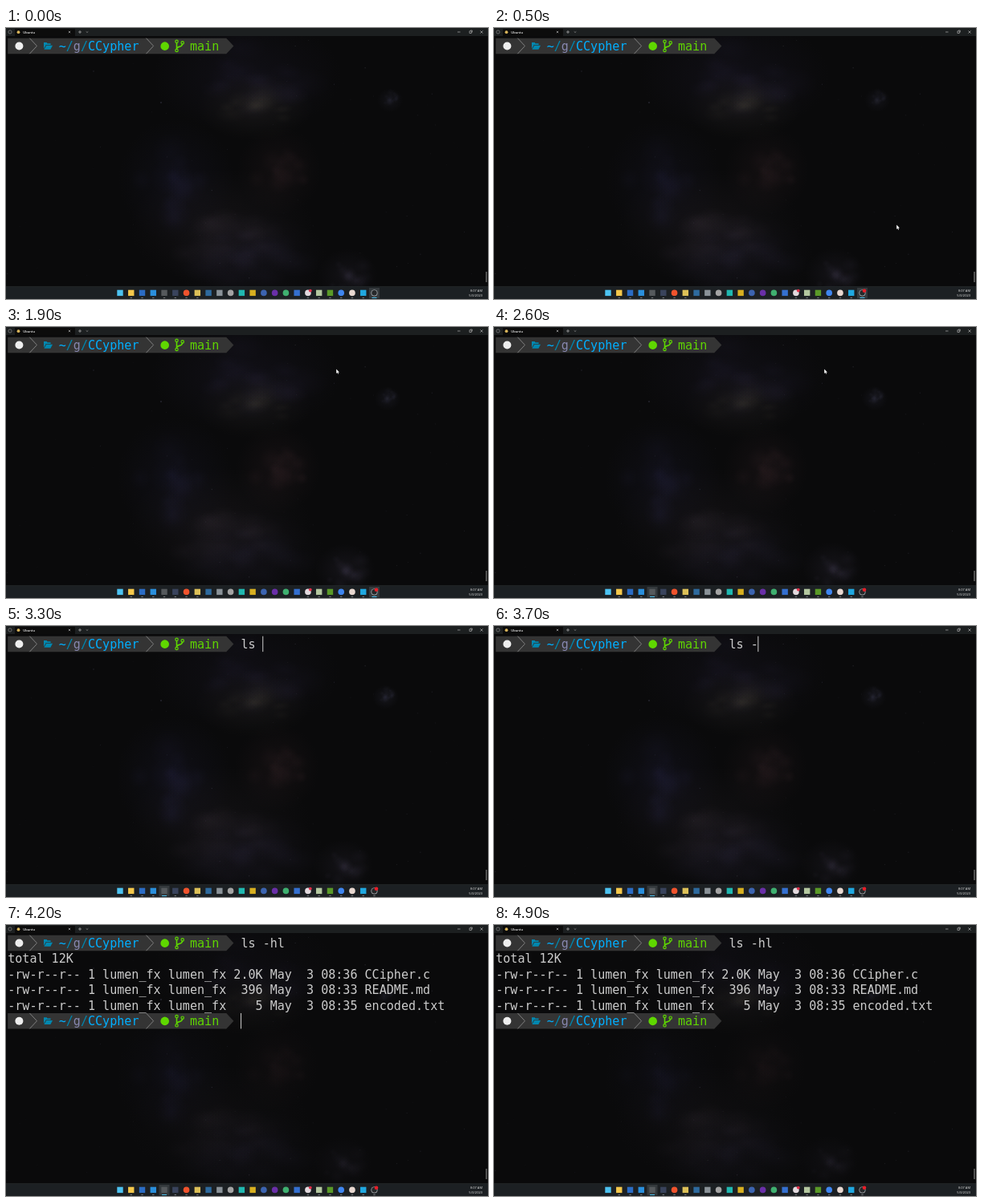
These frames come from a looping animation (600 by 338 pixels, 5 s). An HTML page with a canvas:

```html
<!DOCTYPE html>
<html lang="en">
<head>
<meta charset="utf-8">
<title>Terminal session</title>
<style>
  html, body { margin: 0; width: 100%; height: 100%; overflow: hidden; background: #0a0a0b; }
  canvas { display: block; width: 600px; height: 338px; }
</style>
</head>
<body>
<canvas id="stage"></canvas>
<script>
const W = 600, H = 338, LOOP = 5000, STEP = 100;
const CELL = 9.07, ROW = 19.45, LEFT = 2.2, TOP = 12.7;
const MONO = '15.07px "DejaVu Sans Mono", monospace';
const SANS = '"Open Sans", "Noto Sans", sans-serif';
const BLUE = '#0087af', BRIGHT_BLUE = '#00afff', GREEN = '#5fd700', TEXT = '#cccccc';
const USER = 'lumen_fx';

const FOCUS_AT = 2000, TYPING_AT = 3000, ENTER_AT = 4200, BLINK = 600;
const keys = [[3000, 'l'], [3100, 's'], [3300, ' '], [3600, '-'], [3800, 'h'], [4000, 'l']];

const listing = [
  'total 12K',
  `-rw-r--r-- 1 ${USER} ${USER} 2.0K May  3 08:36 CCipher.c`,
  `-rw-r--r-- 1 ${USER} ${USER}  396 May  3 08:33 README.md`,
  `-rw-r--r-- 1 ${USER} ${USER}    5 May  3 08:35 encoded.txt`
];

// x, y, horizontal radius, vertical radius, colour
const clouds = [
  [300, 60, 95, 58, '58,50,92'],
  [310, 98, 58, 34, '84,78,66'],
  [212, 190, 58, 62, '48,46,92'],
  [340, 178, 42, 44, '88,56,62'],
  [268, 248, 92, 58, '78,66,78'],
  [300, 285, 80, 45, '58,52,84'],
  [478, 90, 13, 12, '86,86,122'],
  [425, 308, 30, 26, '86,78,108']
];

const taskIcons = [
  '#4cc2f0', '#f5c84b', '#2b6cc4', '#2a8fdc', '#55595c', '#39435c', '#f0532d', '#dcc058',
  '#2e6a9e', '#8a9298', '#a4a4a4', '#20b8b0', '#d8b020', '#3c64b0', '#6a2fa8', '#3fb070',
  '#3470d0', '#e2dade', '#b4c8a0', '#5a9a28', '#3f86f0', '#e8d8d0', '#20a8e0', '#b8bcc0'
];
const roundIcons = [6, 10, 13, 14, 15, 17, 20, 21, 23];
const runningIcons = [1, 2, 3, 4, 5, 6, 7, 17, 18, 19, 20, 21, 22, 23];
const TERMINAL = 4, RECORDER = 23;

const canvas = document.getElementById('stage');
const ratio = window.devicePixelRatio || 1;
canvas.width = W * ratio;
canvas.height = H * ratio;
const ctx = canvas.getContext('2d');
ctx.scale(ratio, ratio);

const colX = col => LEFT + col * CELL;
const mix = (a, b, k) => a + (b - a) * k;
const progress = (t, from, to) => Math.min(1, Math.max(0, (t - from) / (to - from)));
const easeOut = k => 1 - (1 - k) ** 2;

function seeded(seed) {
  return () => (seed = seed * 16807 % 2147483647) / 2147483647;
}

function rect(x, y, w, h, color) {
  ctx.fillStyle = color;
  ctx.fillRect(x, y, w, h);
}

function disc(x, y, r, color) {
  ctx.fillStyle = color;
  ctx.beginPath();
  ctx.arc(x, y, r, 0, 7);
  ctx.fill();
}

function trace(points, close) {
  ctx.beginPath();
  points.forEach(([x, y]) => ctx.lineTo(x, y));
  if (close) ctx.closePath();
}

function polygon(points, color) {
  trace(points, true);
  ctx.fillStyle = color;
  ctx.fill();
}

function polyline(points, color, width) {
  trace(points);
  ctx.strokeStyle = color;
  ctx.lineWidth = width;
  ctx.stroke();
}

function label(text, x, y, color, font, align = 'left') {
  ctx.font = font;
  ctx.textAlign = align;
  ctx.fillStyle = color;
  ctx.fillText(text, x, y);
}

function mono(text, col, row, color = TEXT) {
  label(text, colX(col), TOP + row * ROW + 15, color, MONO);
}

function puff(x, y, rx, ry, rgb, alpha) {
  ctx.save();
  ctx.translate(x, y);
  ctx.scale(rx, ry);
  const glow = ctx.createRadialGradient(0, 0, 0, 0, 0, 1);
  glow.addColorStop(0, `rgba(${rgb},${alpha})`);
  glow.addColorStop(0.5, `rgba(${rgb},${alpha * 0.5})`);
  glow.addColorStop(1, `rgba(${rgb},0)`);
  ctx.fillStyle = glow;
  ctx.fillRect(-1, -1, 2, 2);
  ctx.restore();
}

function drawSky(t) {
  rect(0, 0, W, H, '#0a0a0b');
  const random = seeded(4211);
  const drift = t / LOOP;
  const dim = t >= ENTER_AT ? 0.6 : 1;
  clouds.forEach(([x, y, rx, ry, rgb], i) => {
    const cx = x - drift * (i > 5 ? 8 : 4), cy = y - drift * (i > 6 ? 14 : 2);
    const pulse = dim * (1 + 0.12 * Math.sin(drift * 2 * Math.PI + i * 1.7));
    puff(cx, cy, rx * 1.25, ry * 1.25, rgb, 0.13 * pulse);
    for (let n = 0; n < 16; n++) {
      const angle = random() * 7, reach = random() * 0.8, size = mix(0.16, 0.42, random());
      puff(cx + Math.cos(angle) * reach * rx, cy + Math.sin(angle) * reach * ry,
        rx * size, ry * size, rgb, 0.07 * pulse);
    }
  });
  for (let n = 0; n < 70; n++) {
    const x = random() * W, y = 14 + random() * 306;
    disc(x, y, 0.4 + random() * 0.3, `rgba(150,150,175,${0.05 + random() * 0.14})`);
  }
  disc(193, 93, 0.8, 'rgba(150,150,185,0.35)');
  disc(109, 54, 0.7, 'rgba(150,150,185,0.22)');
}

function drawTitleBar() {
  rect(0, 0, W, 10, '#1c1f20');
  rect(11, 1, 75, 9, '#0c0c0c');
  ctx.strokeStyle = '#9a9a9a';
  ctx.lineWidth = 0.6;
  ctx.beginPath();
  ctx.arc(5, 5, 2.1, 0, 7);
  ctx.stroke();
  disc(15.5, 5.2, 1.9, '#d8b45a');
  label('Ubuntu', 21.3, 6.6, '#f2f2f2', `600 4px ${SANS}`);
  const line = '#c8c8c8';
  const cross = (x, y, r) => {
    polyline([[x - r, y - r], [x + r, y + r]], line, 0.6);
    polyline([[x - r, y + r], [x + r, y - r]], line, 0.6);
  };
  cross(79, 5, 1.2);
  polyline([[90, 5], [94, 5]], line, 0.6);
  polyline([[92, 3], [92, 7]], line, 0.6);
  polyline([[99.7, 4.4], [101, 5.6], [102.3, 4.4]], line, 0.5);
  polyline([[562, 5], [565.5, 5]], line, 0.6);
  ctx.strokeRect(577, 3.9, 2.6, 2.6);
  polyline([[578, 3], [580.4, 3], [580.4, 5.4]], line, 0.5);
  cross(592, 5, 1.6);
}

function drawFolder(x, y) {
  polygon([[x, y - 4.5], [x + 3.6, y - 4.5], [x + 4.6, y - 3.2], [x + 8.6, y - 3.2],
    [x + 8.6, y - 1.5], [x + 2.8, y - 1.5], [x, y + 3.2]], BLUE);
  polygon([[x + 3.2, y - 0.7], [x + 11, y - 0.7], [x + 8.4, y + 4.4], [x + 0.4, y + 4.4]], BLUE);
}

function drawBranch(x, y) {
  polyline([[x, y - 4], [x, y + 4]], GREEN, 1.6);
  ctx.beginPath();
  ctx.moveTo(x, y + 3);
  ctx.bezierCurveTo(x + 1, y, x + 7, y + 2, x + 7.2, y - 3);
  ctx.stroke();
  ctx.lineWidth = 1.2;
  for (const [dx, dy] of [[0, -5.6], [0, 5.6], [7.2, -4]]) {
    ctx.beginPath();
    ctx.arc(x + dx, y + dy, 1.7, 0, 7);
    ctx.stroke();
  }
}

function drawPrompt(row) {
  const top = TOP + row * ROW, mid = top + ROW / 2, bottom = top + ROW;
  const arrow = col => [[colX(col), top], [colX(col + 1), mid], [colX(col), bottom]];
  polygon([[LEFT, top], ...arrow(30), [LEFT, bottom]], '#343434');
  for (const col of [3, 19]) polyline(arrow(col), '#808080', 1);
  disc(16.4, mid, 5, '#eeeeee');
  drawFolder(47, mid);
  mono('~', 7, row, BRIGHT_BLUE);
  mono('/', 8, row, BLUE);
  mono('g', 9, row, '#8787af');
  mono('/', 10, row, BLUE);
  mono('CCypher', 11, row, BRIGHT_BLUE);
  disc(197.7, mid + 0.2, 5.3, GREEN);
  drawBranch(212.5, mid);
  mono('main', 25, row, GREEN);
}

function drawCaret(t, col, row) {
  const lastInput = [FOCUS_AT, ...keys.map(key => key[0]), ENTER_AT].filter(at => at <= t).pop();
  if (lastInput === undefined || Math.floor((t - lastInput) / BLINK) % 2) return;
  rect(colX(col) - 0.4, TOP + row * ROW, 1, ROW, TEXT);
}

function drawTerminal(t) {
  const typed = keys.filter(([at]) => at <= t).map(key => key[1]).join('');
  const done = t >= ENTER_AT;
  drawPrompt(0);
  mono(typed, 32, 0);
  if (done) {
    listing.forEach((line, i) => mono(line, 0, i + 1));
    drawPrompt(5);
  }
  drawCaret(t, done ? 32 : 32 + typed.length, done ? 5 : 0);
  rect(597.5, 304, 1, 13, '#9a9a9a');
}

function drawTaskbar(t) {
  rect(0, 322.5, W, 15.5, '#1c2023');
  rect(0, 322.5, W, 0.5, '#2b3033');
  const active = t < FOCUS_AT ? RECORDER : TERMINAL;
  taskIcons.forEach((color, i) => {
    const x = 142 + i * 13.76, y = 330.4;
    if (i === active) rect(x - 6.5, 324, 13, 13, '#34393c');
    if (i === RECORDER) {
      disc(x, y, 4, color);
      disc(x, y, 3.3, '#26282a');
    } else if (roundIcons.includes(i)) disc(x, y, 3.8, color);
    else rect(x - 3.7, y - 3.7, 7.4, 7.4, color);
    if (i === active) rect(x - 3, 336, 6, 1, '#4cc2f0');
    else if (runningIcons.includes(i)) rect(x - 1.2, 336, 2.4, 0.8, '#8a8e90');
  });
  disc(378.8, 327.6, 1.9, '#e0304a');
  if (t >= 300) disc(461, 327.8, 2.3, '#e81e28');
  label('8:07 AM', 593, 329.4, '#e4e4e4', `4px ${SANS}`, 'right');
  label('5/3/2023', 593, 334.8, '#e4e4e4', `4px ${SANS}`, 'right');
}

function drawPointer(t) {
  if (t < 400 || t >= TYPING_AT) return;
  const rise = easeOut(progress(t, 400, 1000)), settle = progress(t, 1100, 1600);
  const x = mix(536, 422, rise) - 10.8 * settle;
  const y = mix(330, 53.6, rise) - 1.1 * settle;
  const shape = [[0, 0], [0, 5.4], [1.2, 4.3], [2, 6.1], [2.9, 5.7], [2.1, 4], [3.8, 3.9]];
  const points = shape.map(([dx, dy]) => [x + dx, y + dy]);
  polygon(points, '#ffffff');
}

function draw(t) {
  drawSky(t);
  drawTitleBar();
  drawTerminal(t);
  drawTaskbar(t);
  drawPointer(t);
}

let shown = -1;
function tick(now) {
  const t = Math.floor(now % LOOP / STEP) * STEP;
  if (t !== shown) draw(shown = t);
  requestAnimationFrame(tick);
}
draw(0);
requestAnimationFrame(tick);
</script>
</body>
</html>
```
